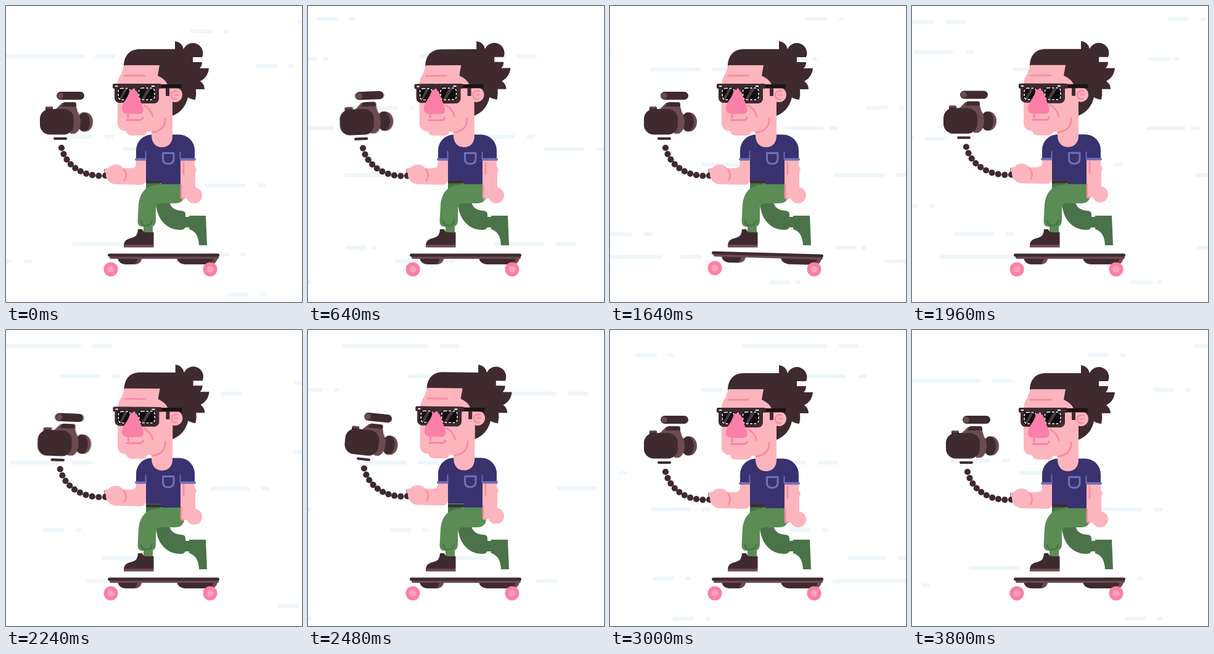
An HTML page with a canvas for the animation above (3840 ms loop, 480 by 480 pixels).

```html
<!DOCTYPE html>
<html lang="en">
<head>
<meta charset="utf-8">
<title>Skater with camera</title>
<style>
  html, body { margin: 0; width: 100%; height: 100%; overflow: hidden; background: #fff; }
  canvas { display: block; }
</style>
</head>
<body>
<canvas id="stage" width="480" height="480"></canvas>
<script>
const ctx = document.getElementById('stage').getContext('2d');
const LOOP = 3840, FRAME = 40, SPEED = 0.304, SPAN = 1170;

const DARK = '#3f2a30', BROWN = '#6d4b51', SKIN = '#fdb5bd', ROSE = '#f98ba0',
  PINK = '#fb7fa8', NAVY = '#39326f', LILAC = '#7170b8',
  GREEN = '#5b8c54', MOSS = '#4a7349', MIST = '#eef6fa';

// Each streak: y, start x at time zero, then dash, gap, dash.
const SHAPES = {
  dot: [35, 18, 9], near: [35, 8, 8], tight: [64, 9, 14], mid: [64, 19, 14],
  wide: [82, 18, 34], long: [139, 18, 33], loose: [138, 28, 35]
};
const STREAKS = [
  [41, 299, 'dot'], [82, -13, 'long'], [97, 405, 'dot'], [212, 77, 'mid'],
  [232, 189, 'mid'], [291, 324, 'mid'], [386, 107, 'wide'], [403, 327, 'dot'],
  [414, -54, 'mid'], [468, 359, 'dot'], [21, -181, 'dot'], [86, -213, 'near'],
  [103, -433, 'wide'], [198, -216, 'tight'], [257, -350, 'mid'], [448, -241, 'near'],
  [75, -593, 'mid'], [165, -83, 'dot'], [274, -136, 'wide'], [370, -527, 'mid'],
  [26, -698, 'long'], [215, -675, 'wide'], [324, -621, 'dot'], [392, -134, 'near'],
  [407, -551, 'loose']
];

// Sway keys: time, camera dx, camera dy, tilt in degrees.
const SWAY = [
  [0, 0, 0, 0], [480, 0, 0, 0], [920, -6, 1, -8], [1080, -6, 1, -8], [1520, 0, 0, 0],
  [1800, 0, 0, 0], [1960, -4, -1.5, 0], [2140, -6, -4, 1], [2480, 2, -5.5, 6],
  [2620, 3, -4.5, 5], [2920, 0, 0, 0], [LOOP, 0, 0, 0]
];

const smooth = u => u * u * (3 - 2 * u);

function swayAt(t) {
  t = Math.min(Math.max(t, 0), LOOP);
  const i = Math.max(1, SWAY.findIndex(k => k[0] >= t));
  const a = SWAY[i - 1], b = SWAY[i];
  const u = smooth((t - a[0]) / (b[0] - a[0]));
  const [dx, dy, tilt] = [1, 2, 3].map(n => a[n] + (b[n] - a[n]) * u);
  return { dx, dy, tilt };
}

function fill(color, d) {
  ctx.fillStyle = color;
  ctx.fill(new Path2D(d));
}

function line(color, width, d, cap = 'round') {
  ctx.strokeStyle = color;
  ctx.lineWidth = width;
  ctx.lineCap = cap;
  ctx.lineJoin = 'round';
  ctx.stroke(new Path2D(d));
}

function disc(color, x, y, rx, ry = rx) {
  ctx.fillStyle = color;
  ctx.beginPath();
  ctx.ellipse(x, y, rx, ry, 0, 0, Math.PI * 2);
  ctx.fill();
}

function box(color, x, y, w, h, r = 0) {
  ctx.fillStyle = color;
  ctx.beginPath();
  ctx.roundRect(x, y, w, h, r);
  ctx.fill();
}

function placed(dx, dy, degrees, px, py, draw) {
  ctx.save();
  ctx.translate(px + dx, py + dy);
  ctx.rotate(degrees * Math.PI / 180);
  ctx.translate(-px, -py);
  draw();
  ctx.restore();
}

function streaks(t) {
  for (const [y, start, kind] of STREAKS) {
    const [first, gap, second] = SHAPES[kind];
    let x = (start + SPEED * t) % SPAN;
    if (x > 600) x -= SPAN;
    if (x < -600) x += SPAN;
    box(MIST, x, y - 3.25, first, 6.5, 3.25);
    box(MIST, x + first + gap, y - 3.25, second, 6.5, 3.25);
  }
}

function board(t) {
  const bump = t > 1480 && t < 1800 ? Math.sin((t - 1480) / 320 * Math.PI) : 0;
  placed(0, -1.3 * bump, 1.6 * bump, 255, 404, () => {
    fill(DARK, 'M181 409H220Q219 419 207 419H193Q183 418 181 409Z M277 409H343Q341 419 331 419H290Q279 418 277 409Z');
    fill(BROWN, 'M213 409H220Q219 418 208 419Q213 415 213 409Z M336 409H343Q341 418 332 419Q336 415 336 409Z');
    box(BROWN, 168, 404, 177, 6, 2);
    box(DARK, 165, 401.5, 181, 5, 2.5);
  });
  for (const [x, y] of [[170, 427 - 2 * bump], [331, 427]]) {
    disc(PINK, x, y, 11.5);
    disc('#fda3b3', x, y, 5.5);
  }
}

function legs() {
  fill(MOSS, 'M243 318C244 347 262 364 284 363Q291 363 291 356V338Q291 332 284 332Q268 331 265 318Z');
  box(MOSS, 289, 342, 10, 17);
  fill(MOSS, 'M297 340H324L326 388H313Q312 366 297 362Z');
  box(GREEN, 223, 350, 15, 19);
  fill(DARK, 'M214 362H221Q222 367 228 367H239.5V387H191Q192 378 204 376Q214 374 214 362Z');
  box(BROWN, 191, 387, 48.5, 4.5);
  fill(MOSS, 'M227 282H255V295L227 306Z');
  box('#35322f', 227, 283, 26, 4.5);
  fill(GREEN, 'M247 290L250 287H289V305Q289 320 274 320H252Q243 320 243 329V348Q243 358 233 358H222Q213.5 358 213.5 349L215 322C217 302 228 290 247 290Z');
  line(MOSS, 2.5, 'M219 348Q220 356 227 356Q236 356 237 348');
}

function arms(dy) {
  placed(0, dy, 0, 0, 0, () => {
    fill(SKIN, 'M211 244H227V282Q226 290 218 290L178 289V263H204Q211 262 211 255Z');
    disc(SKIN, 178, 273, 16);
    disc(SKIN, 164, 267, 4.5);
    line(ROSE, 2.6, 'M191 265Q198 274 192 283');
    fill(SKIN, 'M283 242H306V260Q311 265 307 270V296H312V312H283Z');
    disc(SKIN, 305, 307, 13);
    line(ROSE, 2.6, 'M288 254V273');
    line(ROSE, 2.6, 'M284 291V310Q284 313 288 312');
  });
}

function shirt() {
  fill(NAVY, 'M211 250V234A25.5 25.5 0 0 1 236.5 208.5H280.5A25.5 25.5 0 0 1 306 234V250H283V289H252V283H227V250Z');
  line(LILAC, 4, 'M211 248.7H226M284 248.7H306');
  line(LILAC, 1.8, 'M226.5 236V248M282.5 237V248');
  line(LILAC, 3, 'M254.5 238.5H272V247Q272 256 263 256T254.5 247Z');
}

function glasses() {
  box('#1c1215', 247, 127, 38, 6.5, 1);
  box(DARK, 259, 133, 6, 13, 1);
  box(DARK, 173, 126, 79, 8, 2);
  box(DARK, 176, 126, 30, 31, [3, 3, 8, 8]);
  box(DARK, 209, 126, 39, 32, [3, 3, 8, 8]);
  box('#100b0d', 180, 132, 22.5, 21.5, 6);
  box('#100b0d', 213.5, 131.5, 29, 22, 6);
  fill('#4b3c42', 'M192 134H197L187 152H183Z M229 134H235L224 152H219Z');
  ctx.setLineDash([4, 2.4]);
  ctx.strokeStyle = '#fff';
  ctx.lineWidth = 1.5;
  ctx.lineCap = 'butt';
  ctx.beginPath();
  ctx.roundRect(182, 133.5, 19.5, 18.5, 5);
  ctx.roundRect(215.5, 133, 25.5, 19, 5);
  ctx.stroke();
  ctx.setLineDash([]);
  line('#fff', 2, 'M177 130H181M236 130H241', 'butt');
}

function head() {
  fill(DARK, `M191 98C191 80 201 70 217 70H274V57Q286 59 288 70A16 16 0 0 1 318 83H303V91H318
    Q318 97 314 101H329C328 111 323 118 315 122Q322 127 322 135H308Q309 144 307 152
    Q299 151 295 148Q290 170 270 178H246V98Z`);
  fill(SKIN, `M192 96H249L246 113C254 117 260 121 262 128H270V211
    C270 222 263 229 253 229S236 222 236 210V204H229Q227 210 221 210H204
    Q196 210 195 203Q181 202 181 190V126Q182 116 187 110Z`);
  disc(SKIN, 274, 144, 12);
  line(ROSE, 2.6, 'M278 138Q268 137 268 145Q269 152 277 151M273 144H279');
  line(ROSE, 2.8, 'M192 113H225M258 182Q259 202 237 205M224 161Q235 167 238 179');
  line(PINK, 2.8, 'M198 175V181M196 185H215Q222 185 222 181');
  glasses();
  fill(PINK, 'M201 136Q210 134 213 140L222 164Q225 175 215 175H197Q187 174 188 165C190 154 198 150 201 136Z');
}

function cameraBody() {
  fill(BROWN, 'M74 170L82 166L91 157H112L116 170V180H74Z');
  fill(DARK, 'M94 156H111Q114 156 114 160V163H90Z');
  box(DARK, 82, 139, 45, 13, 6.5);
  disc(BROWN, 88, 145.5, 4.8, 5);
  disc(BROWN, 128.5, 188, 12.5, 15.5);
  disc(DARK, 126, 188, 10, 15.5);
  fill(BROWN, 'M104 169H113Q121 174 121 188T112 207H104Z');
  box(DARK, 64, 163, 12, 10, 2);
  box(BROWN, 65, 163, 10, 3, 1.5);
  box(DARK, 55, 167, 55, 41.5, 16);
  line(DARK, 4, 'M79 215H97');
}

function camera(t) {
  const drawAt = (time, alpha) => {
    const { dx, dy, tilt } = swayAt(time);
    ctx.globalAlpha = alpha;
    placed(dx, dy, tilt, 88, 215, cameraBody);
    ctx.globalAlpha = 1;
  };
  const a = swayAt(t - 20), b = swayAt(t + 20);
  if (Math.abs(a.dx - b.dx) > 0.7) {
    drawAt(t - 40, 0.35);
    drawAt(t + 40, 0.35);
  }
  drawAt(t, 1);
}

function chain({ dx, dy, tilt }) {
  const drop = tilt < 0 ? -tilt / 8 : 0;
  const points = [[90 + dx * 0.5, 230 + dy + drop], [98 + dx * 0.5, 262 + dy], [129, 278 + dy], [161, 275 + dy]];
  const last = 9;
  for (let i = 0; i <= last; i++) {
    const u = i / last, v = 1 - u;
    const weights = [v * v * v, 3 * v * v * u, 3 * v * u * u, u * u * u];
    const [x, y] = [0, 1].map(n => weights.reduce((sum, w, j) => sum + w * points[j][n], 0));
    disc(DARK, x, y, 5.1);
  }
  line(DARK, 4, `M161 ${266 + dy}L163 ${278 + dy}`);
}

function draw(t) {
  const sway = swayAt(t), rise = Math.min(sway.dy, 0), lift = rise * 0.25;
  ctx.fillStyle = '#fff';
  ctx.fillRect(0, 0, 480, 480);
  streaks(t);
  board(t);
  legs();
  chain(sway);
  arms(rise);
  placed(0, lift, 0, 0, 0, shirt);
  placed(0, lift, sway.tilt / 8, 253, 228, head);
  camera(t);
}

function tick() {
  const t = performance.now() % LOOP;
  draw(Math.floor(t / FRAME) * FRAME);
  requestAnimationFrame(tick);
}
tick();
</script>
</body>
</html>
```
